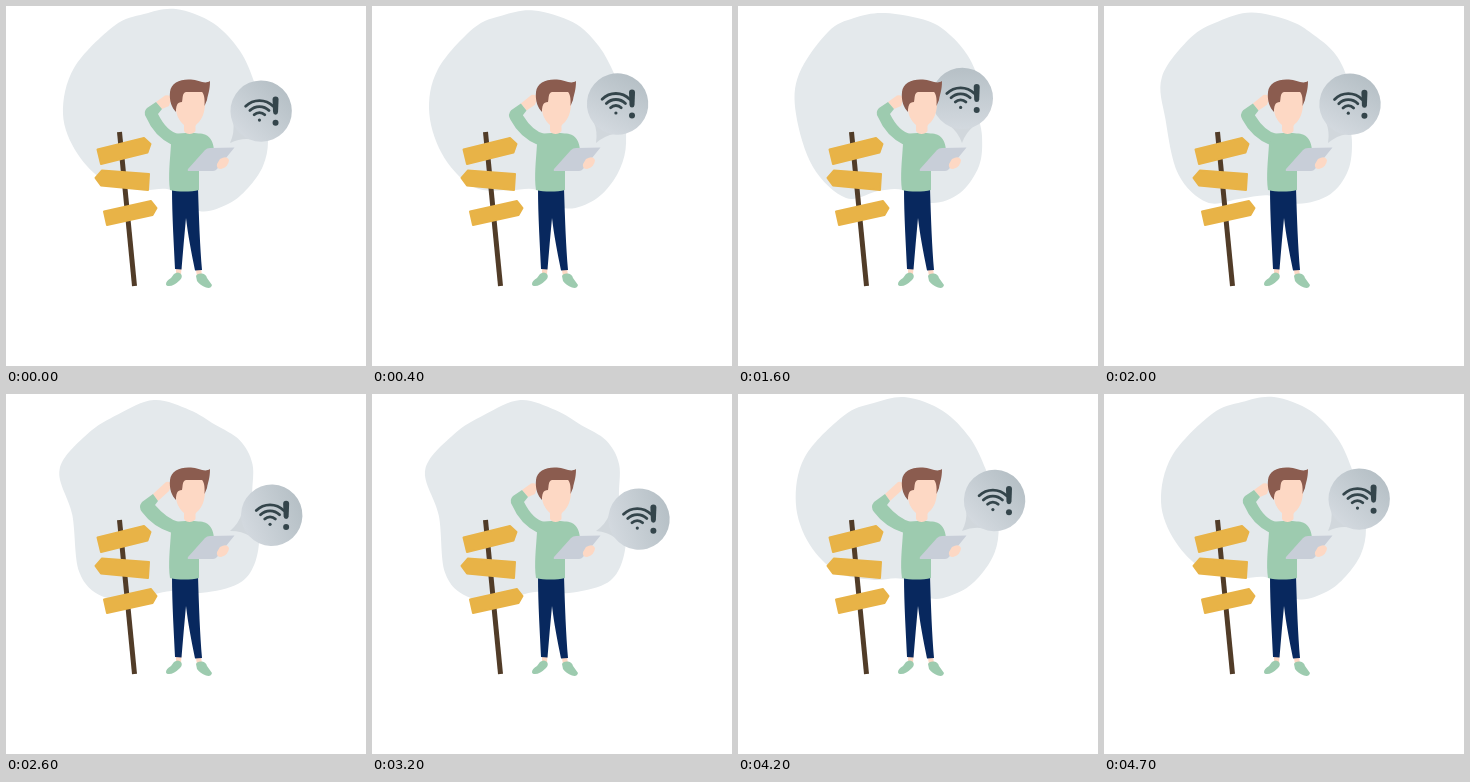
Recreate the animation shown at these times as an HTML page with a canvas. Size 360 by 360 pixels, loop 4.8 s.

```html
<!DOCTYPE html>
<html lang="en">
<head>
<meta charset="utf-8">
<title>Lost signal</title>
<style>
html, body { margin: 0; width: 100%; height: 100%; overflow: hidden; background: #fff; }
canvas { display: block; width: 360px; height: 360px; }
</style>
</head>
<body>
<canvas id="stage" width="360" height="360"></canvas>
<script>
const ctx = document.getElementById('stage').getContext('2d');
const LOOP = 4800, STEP = 100;
const SKIN = '#fdd8c4', GREEN = '#9dcbaf', GOLD = '#e8b347', NAVY = '#08285e';

const mix = (a, b, k) => a + (b - a) * k;

// Cubic bezier easing with control points (.3, 0) and (.2, 1)
function ease(x) {
  let lo = 0, hi = 1;
  for (let i = 0; i < 24; i++) {
    const s = (lo + hi) / 2, r = 1 - s;
    if (.9 * s * r * r + .6 * s * s * r + s * s * s < x) lo = s; else hi = s;
  }
  return lo * lo * (3 - 2 * lo);
}

function smooth(a, b, x) {
  const k = Math.min(1, Math.max(0, (x - a) / (b - a)));
  return k * k * (3 - 2 * k);
}

// Three poses of the backdrop and the bubble
const poses = [
  { at: 0, angle: 44.3, blob: [170,3, 207,17, 234,45, 249,78, 257,105, 262,135, 257,160, 242,182, 222,198,
    193,205, 165,184, 135,184, 100,176, 71,147, 57,108, 68,62, 108,20, 138,8] },
  { at: 1600, angle: 0.4, blob: [147,7, 190,15, 212,29, 230,50, 241,77, 239,103, 244,130, 241,160, 222,187,
    193,197, 165,184, 140,185, 108,192, 75,161, 58,108, 61,68, 90,26, 116,12] },
  { at: 3100, angle: 75, blob: [148,6, 183,16, 209,31, 234,46, 247,70, 247,105, 254,140, 249,171, 233,190,
    197,199, 165,198, 130,205, 95,203, 73,179, 67,122, 53,76, 81,41, 112,21] }
];

function poseAt(t) {
  let i = poses.length - 1;
  while (poses[i].at > t) i--;
  const a = poses[i], b = poses[(i + 1) % poses.length];
  const end = b.at || LOOP;
  const k = ease((t - a.at) / (end - a.at));
  return {
    angle: mix(a.angle, b.angle, k) * Math.PI / 180,
    blob: a.blob.map((v, j) => mix(v, b.blob[j], k))
  };
}

function fill(d, color) {
  ctx.fillStyle = color;
  ctx.fill(new Path2D(d));
}

function rounded(d, color) {
  const p = new Path2D(d);
  ctx.fillStyle = ctx.strokeStyle = color;
  ctx.lineJoin = 'round';
  ctx.lineWidth = 2;
  ctx.fill(p);
  ctx.stroke(p);
}

function disc(x, y, r, color) {
  ctx.fillStyle = color;
  ctx.beginPath();
  ctx.arc(x, y, r, 0, Math.PI * 2);
  ctx.fill();
}

function drawBlob(v) {
  const n = v.length / 2;
  const at = i => { const j = (i + n) % n * 2; return [v[j], v[j + 1]]; };
  ctx.beginPath();
  ctx.moveTo(v[0], v[1]);
  for (let i = 0; i < n; i++) {
    const [p, a, b, q] = [at(i - 1), at(i), at(i + 1), at(i + 2)];
    ctx.bezierCurveTo(a[0] + (b[0] - p[0]) / 6, a[1] + (b[1] - p[1]) / 6,
      b[0] - (q[0] - a[0]) / 6, b[1] - (q[1] - a[1]) / 6, b[0], b[1]);
  }
  ctx.fillStyle = '#e4e9ec';
  ctx.fill();
}

function drawBubble(angle) {
  const reach = 44.6, ink = '#34454b';
  ctx.save();
  ctx.translate(224, 137);
  ctx.rotate(angle);
  fill('M0 0Q-4 -11 -12 -17L12 -17Q4 -11 0 0Z', '#d1d7dc');
  const g = ctx.createLinearGradient(0, -14, 0, -75);
  g.addColorStop(0, '#d3d9df');
  g.addColorStop(1, '#b6c0c6');
  disc(0, -reach, 30.7, g);
  ctx.restore();

  ctx.save();
  ctx.translate(224 + reach * Math.sin(angle), 137 - reach * Math.cos(angle));
  ctx.strokeStyle = ink;
  ctx.lineCap = 'round';
  ctx.lineWidth = 2.8;
  for (const r of [7.5, 13.5, 19.5]) {
    ctx.beginPath();
    ctx.arc(-1.7, 9, r, -Math.PI * .75, -Math.PI * .25);
    ctx.stroke();
  }
  disc(-1.7, 9, 1.6, ink);
  fill('M11.4 -11.5Q11.4 -14.5 14.4 -14.5Q17.4 -14.5 17.4 -11.5L16.9 1Q16.7 3.6 14.4 3.6Q12.1 3.6 11.9 1Z', ink);
  disc(14.4, 11.6, 3, ink);
  ctx.restore();
}

function drawSigns() {
  ctx.strokeStyle = '#513c28';
  ctx.lineCap = 'butt';
  ctx.lineWidth = 5;
  ctx.beginPath();
  ctx.moveTo(113.5, 126);
  ctx.lineTo(128.5, 280);
  ctx.stroke();
  rounded('M91.5 143.5L138 132L144.5 138L141.5 146.5L95 158Z', GOLD);
  rounded('M96 164.5L143 168L142 184L95 179.5L89.5 172Z', GOLD);
  rounded('M98 205.5L145 195L150.5 202L146.5 209L101 219Z', GOLD);
}

// Raised arm: k moves the elbow out and down
function drawArm(k) {
  const p = (x1, y1, x2, y2) => mix(x1, x2, k) + ' ' + mix(y1, y2, k);
  const cuffIn = p(156, 103, 152, 107), cuffOut = p(150, 96, 147, 100);
  fill(`M${cuffOut}L${p(159, 89.5, 160, 88)}Q${p(165, 88, 165, 87)} ${p(165, 94, 165, 92)}` +
    `L${p(163, 100, 163, 97)}L${cuffIn}Z`, SKIN);
  fill(`M173 128Q${p(161, 126, 161, 125)} ${p(152, 108, 149, 111)}L${cuffIn}L${cuffOut}` +
    `L${p(141, 102, 136, 108)}Q${p(137, 106, 132, 113)} ${p(140, 111, 136, 118)}` +
    `Q${p(148, 130, 147, 133)} 166 139Z`, GREEN);
}

function drawMan(k) {
  fill('M170 261H175.500L175 269H170ZM189.500 262H195L196 270H191Z', SKIN);
  fill('M166 182H192C193 215 194 240 196 264L189 264.500C185 245 182 229 180 212' +
    'C178.500 228 177 245 175.500 263.500L169 263C168 240 166 210 166 182Z', NAVY);
  fill('M160 278Q160 275 165 272L168 268Q172 265 175 268Q177 271 174 274Q168 280 163 280Q160 280 160 278Z', GREEN);
  fill('M190 270Q191 267 196 267.500Q200 268 201 272L206 279Q205 283 200 281.500Q194 279 191 275Z', GREEN);
  drawArm(k);
  fill('M170 128C176 126.500 194 126.500 199 128.500C206 131.500 208 139 208 146L204 160L193 165' +
    'L193 184C185 186 172 186 164 184C162 170 164 155 165 138Z', GREEN);
  fill('M175 84H198C200 95 200 108 193 116C190 119 189.500 119 189.500 121V125' +
    'C187 129 180 129 178 125V119C172 114 169 106 170 98Z', SKIN);
  fill('M170 106C166 102 163 95 164 86C165 77 174 73 184 73.500C192 73 198 79 204 75' +
    'C204 84 202 88 201 94L198.500 100C199 92 198 88 196 86H180C176 87 177 92 176 96C171 96 170 100 170 106Z', '#8b5c4f');
  fill('M182 163L199 144Q201 142 204 142L228.500 141.500L211 163Q209.500 165 207 165H183Q181 165 182 163Z', '#c8ced8');
  fill('M214 153Q221 149 223 154Q222.500 161 215 163Q210 163 211 158Z', SKIN);
}

function draw(t) {
  ctx.fillStyle = '#fff';
  ctx.fillRect(0, 0, 360, 360);
  const pose = poseAt(t);
  const beat = t % 1600 / 1600;
  drawBlob(pose.blob);
  drawBubble(pose.angle);
  drawSigns();
  drawMan(smooth(.2, .32, beat) - smooth(.7, .9, beat));
}

function tick() {
  draw(Math.floor(performance.now() % LOOP / STEP) * STEP);
  requestAnimationFrame(tick);
}
tick();
</script>
</body>
</html>
```
